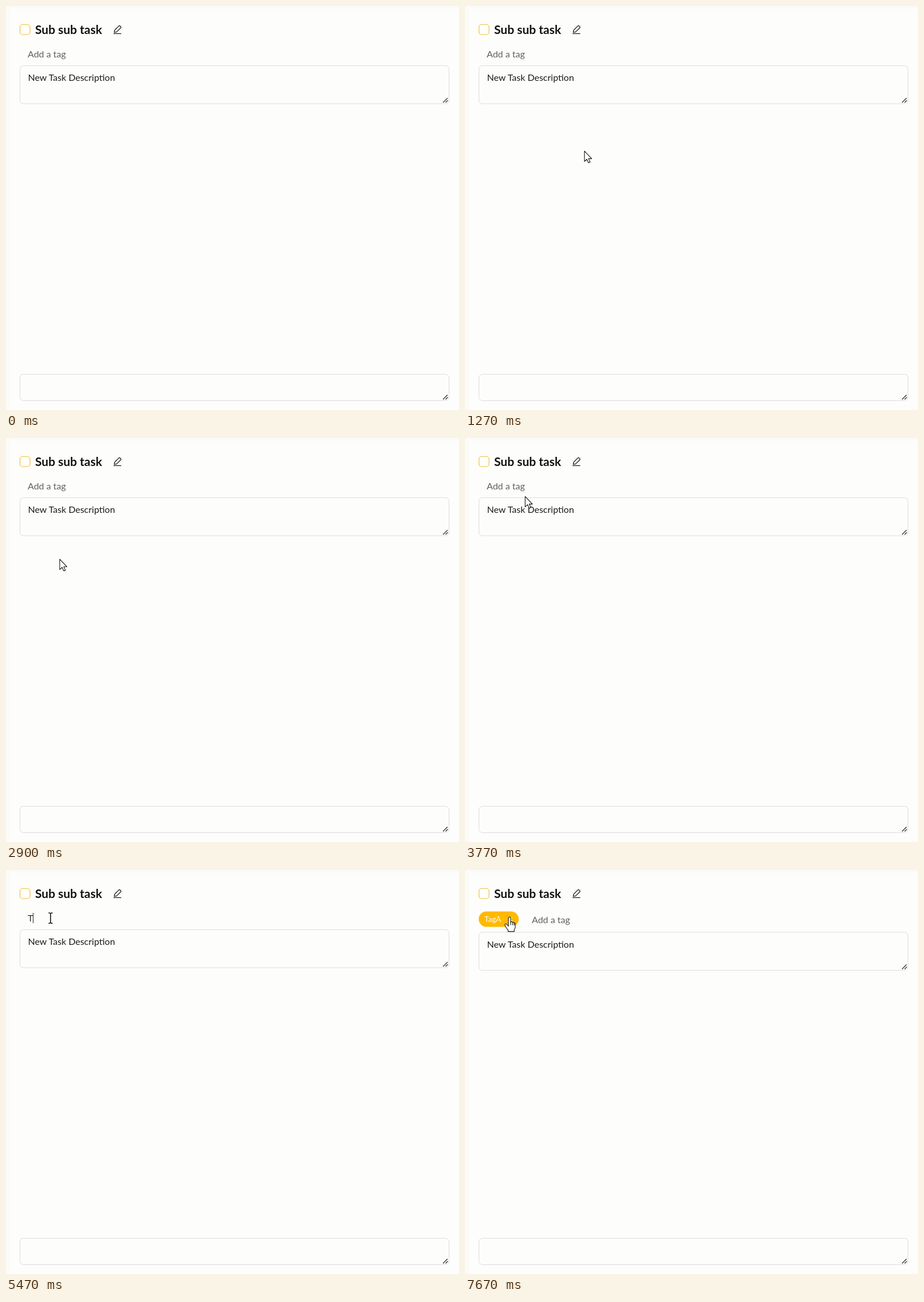
These frames come from a looping animation (793 by 707 pixels, 8 s). An HTML page:

```html
<!DOCTYPE html>
<html lang="en">
<head>
<meta charset="utf-8">
<title>Task tag editor</title>
<style>
  html, body { margin: 0; width: 100%; height: 100%; overflow: hidden; background: #fdfdfb; }
  svg { display: block; width: 793px; height: 707px; }
  text { font: 16px Lato, "Open Sans", sans-serif; fill: #1b1b1b; }
  #title { font-size: 21px; font-weight: 700; fill: #111; }
  #hint { fill: #5f5f5f; }
  #typed { fill: #2c2c38; }
  #chip text { font-size: 13.5px; fill: #fff; }
  .box { fill: none; stroke: #dcdce0; }
  .line { fill: none; stroke: #1b1b1b; stroke-width: 1.3; stroke-linecap: round; stroke-linejoin: round; }
  .pointer { fill: #fff; stroke: #111; stroke-width: 1.1; stroke-linejoin: round; }
</style>
</head>
<body>
<svg viewBox="0 0 793 707" xmlns="http://www.w3.org/2000/svg">
  <defs>
    <path id="grip" d="M765 65.5L773 57.5M769.5 65.5L773.5 61.5" stroke="#333" stroke-width="1.3"/>
  </defs>
  <rect width="793" height="707" fill="#fbfbf8"/>
  <rect x="5.5" y="3.5" width="800" height="720" fill="#fdfdfb" stroke="#f8f8f5"/>

  <rect x="24.5" y="32.5" width="17.5" height="17.5" rx="4.5" fill="#fff" stroke="#f0bf40" stroke-width="1.2"/>
  <text id="title" x="51" y="48.5">Sub sub task</text>
  <g class="line">
    <path d="M189.6 46.2L190.3 42.2L197.6 34.9Q198.6 34 199.6 34.9L200.9 36.2Q201.8 37.2 200.9 38.2L193.6 45.4Z"/>
    <path d="M188.7 48.4H201.3"/>
  </g>

  <text id="hint" y="90">Add a tag</text>
  <text id="typed" x="38" y="90"></text>
  <rect id="caret" y="75" width="1" height="18" fill="#222"/>

  <g id="chip">
    <rect x="24" y="72.5" width="70" height="27" rx="13.5" fill="#ffb901"/>
    <text x="34" y="91">TagA</text>
    <path d="M76.5 83L82.5 89M82.5 83L76.5 89" stroke="#fff" stroke-width="1.3"/>
  </g>

  <g id="desc">
    <rect class="box" x="24.5" y="104.5" width="751" height="66.5" rx="6"/>
    <text x="38.5" y="131">New Task Description</text>
    <use href="#grip" y="103.5"/>
  </g>
  <rect class="box" x="24.5" y="644.5" width="751" height="46" rx="6"/>
  <use href="#grip" y="623"/>

  <g id="cursor">
    <path id="arrow" class="pointer" d="M.5 .5V18.6L4.7 14.8L7.6 21L10.4 19.8L7.6 13.7H13.2Z"/>
    <path id="beam" fill="none" stroke="#111" stroke-width="1.6" d="M-3.6 -8.8H-1.4L0 -7.8L1.4 -8.8H3.6M0 -7.8V8.2M-3.6 9.2H-1.4L0 8.2L1.4 9.2H3.6"/>
    <g id="hand" class="pointer">
      <path d="M-2 14.5V.2Q-2 -1.8 0 -1.8Q2 -1.8 2 .2V7Q4.2 5.7 5.4 7.7Q7.4 6.7 8.1 8.8Q10 8.2 10 10.8V15.5Q10 18 8.2 20.2V23.6H-2.6V21Q-5.3 18.8 -7.6 13.7Q-9 11.2 -7.2 10.4Q-5.4 9.8 -4 12Z"/>
      <path fill="none" d="M2 7V12.5M5.4 7.7V12.5M8.1 8.8V13"/>
    </g>
  </g>
</svg>
<script>
const LOOP = 8000, ENTER = 400, FOCUS = 4470, COMMIT = 7530, BLINK = 500;
const WORD = "TagA", keyTimes = [5470, 6100, 6430, 7040];
const el = id => document.getElementById(id);
const show = (id, on) => { el(id).style.display = on ? "" : "none"; };
const clamp = u => Math.min(1, Math.max(0, u));
const easeOut = u => 1 - (1 - u) ** 1.7;

// each hand movement runs on from the last; bend is the control point of a curve
const origin = [769, 666];
const moves = [
  { from: 400, to: 830, end: [334, 321], bend: [420, 100] },
  { from: 1070, to: 1430, end: [167, 231] },
  { from: 1870, to: 2230, end: [85, 604] },
  { from: 2230, to: 2630, end: [93, 212], bend: [45, 420] },
  { from: 2900, to: 3300, end: [215, 113] },
  { from: 3470, to: 3770, end: [105, 102], bend: [230, 150] },
  { from: 3770, to: 4030, end: [78, 84] }
];

function position(t) {
  return moves.reduce((p, { from, to, end, bend }) => {
    const u = easeOut(clamp((t - from) / (to - from))), v = 1 - u;
    return p.map((a, k) => bend
      ? a * v * v + 2 * bend[k] * u * v + end[k] * u * u
      : a * v + end[k] * u);
  }, origin);
}

function drawPointer(t, done) {
  show("cursor", t >= ENTER);
  const [x, y] = position(t);
  const inBox = x > 24 && x < 762 && (y > 104 && y < 171 || y > 644 && y < 690);
  const inTag = y > 72 && y < 96;
  const kind = done ? "hand" : inBox || inTag ? "beam" : "arrow";
  for (const id of ["arrow", "beam", "hand"]) show(id, id === kind);
  el("cursor").setAttribute("transform", `translate(${x.toFixed(2)} ${y.toFixed(2)})`);
}

function draw(t) {
  const done = t >= COMMIT;
  const pressed = keyTimes.filter(k => t >= k);
  const text = done ? "" : WORD.slice(0, pressed.length);
  const typed = el("typed");
  typed.textContent = text;

  show("hint", !text);
  el("hint").setAttribute("x", done ? 117 : 38);
  el("hint").setAttribute("y", done ? 92.5 : 90);

  // every key press restarts the blinking
  const since = t - Math.max(FOCUS, ...pressed);
  show("caret", since >= 0 && !done && Math.floor(since / BLINK) % 2 === 0);
  el("caret").setAttribute("x", Math.floor(38 + (text ? typed.getComputedTextLength() : 0)));

  show("chip", done);
  const pop = 1 + 0.03 * (1 - clamp((t - COMMIT) / 140));
  el("chip").setAttribute("transform", `translate(59 86) scale(${pop}) translate(-59 -86)`);
  el("desc").setAttribute("transform", `translate(0 ${done ? 4.5 : 0})`);
  drawPointer(t, done);
}

const start = performance.now();
function tick() {
  draw((performance.now() - start) % LOOP);
  requestAnimationFrame(tick);
}
tick();
</script>
</body>
</html>
```
